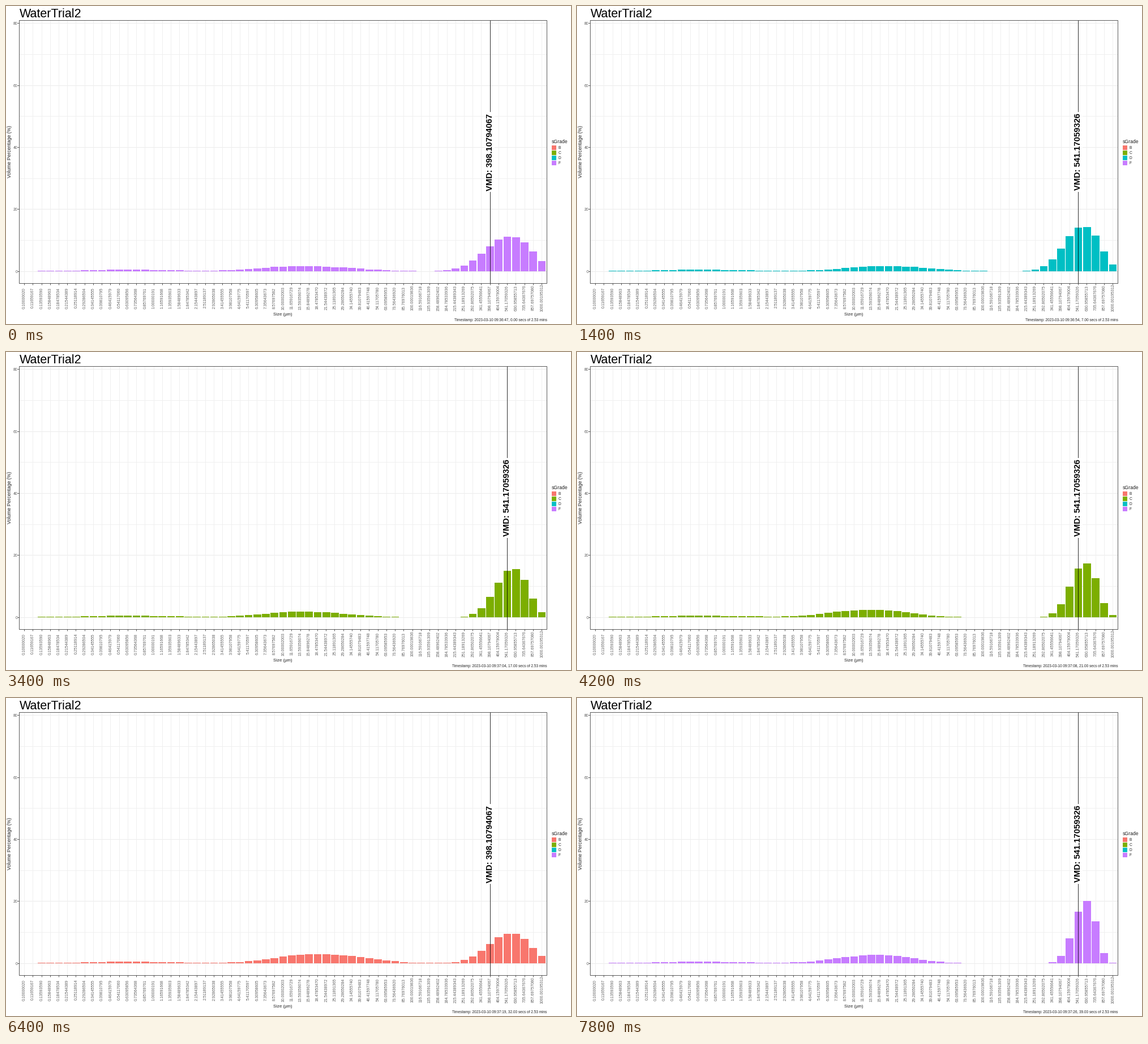
Animation, 998 px wide and 561 px high, one loop 8000 ms. Source, as a matplotlib script:

```python
import numpy as np
import matplotlib.pyplot as plt
from matplotlib.animation import FuncAnimation
from matplotlib.patches import Rectangle

W, H, DPI = 998, 561, 64
FRAMES, STEP_MS = 40, 200
LEFT, RIGHT, TOP, BOTTOM = 23, 955, 25, 489
X0, DX = 32.1, 15.233
ZERO, PER_PCT = 468, 5.475
VISIBLE = .075

COLORS = {"B": "#F8766D", "C": "#7CAE00", "D": "#00BFC4", "F": "#C77CFF"}
DIM, DARK = "#606060", "#222222"

# Size classes: 15 per decade, stored in single precision
N = 61
IDX = np.arange(N)
SIZES = [f"{np.float32(1.00000196 * 10 ** (i / 15 - 1)):.8f}" for i in IDX]

# Key moments (s) of the spray: spread of the coarse mode,
# then height and centre of the middle mode
KEY_T = [0, 7, 17, 21, 27, 32, 39]
SPREAD = [2.78, 2.17, 1.97, 1.63, 2.18, 2.53, 1.37]
MID_TOP = [1.67, 1.68, 1.82, 2.42, 2.65, 2.95, 2.68]
MID_POS = [31.7, 33.2, 32, 31.5, 32.8, 33.5, 32.5]


def state(t):
    return [np.interp(t, KEY_T, track) for track in (SPREAD, MID_TOP, MID_POS)]


def bell(centre, left, right):
    d = IDX - centre
    rise = (np.abs(d) / left) ** 2
    fall = (np.abs(d) / right) ** 2.4
    return np.exp(-np.where(d < 0, rise, fall) / 2)


def spectrum(t):
    spread, top, pos = state(t)
    v = .5 * bell(12, 5.2, 6) + top * bell(pos, 4.3, 2.7 + 1.3 * spread)
    coarse = bell(57.4 - .4 * spread, spread, .92 * spread)
    # The coarse mode takes whatever is left of 100 %
    v += coarse * (100 - v.sum()) / coarse.sum()
    return np.where(v > VISIBLE, np.maximum(v, .2), 0)


def vmd_class(t):
    spread, top, _ = state(t)
    return min(56, round(64.2 - 3 * spread - top))


def grade(t):
    return "FDCBF"[sum(t >= s for s in (4, 12, 24, 36))]


def caption(t):
    sec = 47 + t
    return (f"Timestamp: 2023-03-10 09:{36 + sec // 60}:{sec % 60:02d}, "
            f"{t:.2f} secs of 2.53 mins")


def px(size):
    return size * 72 / DPI


plt.rcParams["font.family"] = "Liberation Sans"
fig = plt.figure(figsize=(W / DPI, H / DPI), dpi=DPI, facecolor="white")
ax = fig.add_axes([0, 0, 1, 1])
ax.set(xlim=(0, W), ylim=(H, 0))
ax.axis("off")


def text(x, y, s, size, color=DARK, ha="left", va="baseline", **kw):
    return ax.text(x, y, s, fontsize=px(size), color=color, ha=ha, va=va, **kw)


def upright(x, y, s, size, color=DARK, **kw):
    return text(x, y, s, size, color, "center", "center", rotation=90, **kw)


def line(xs, ys, color, width, z):
    return ax.plot(xs, ys, color=color, lw=px(width), zorder=z,
                   solid_capstyle="butt")[0]


def box(x, y, w, h, color, z):
    return ax.add_patch(Rectangle((x, y), w, h, fc=color, lw=0, zorder=z))


def x_of(i):
    return X0 + DX * i


# Grid, ticks and axis labels
for pct in range(0, 90, 10):
    y = round(ZERO - pct * PER_PCT)
    major = pct % 20 == 0
    line([LEFT, RIGHT], [y, y], "#EBEBEB" if major else "#F0F0F0", 1, 1)
    if major:
        line([LEFT - 3, LEFT], [y, y], "#333333", .8, 1)
        text(LEFT - 2.5, y + .9, str(pct), 7, DIM, "right", "center_baseline")
for i, label in enumerate(SIZES):
    x = x_of(i)
    line([x, x], [TOP, BOTTOM], "#EFEFEF", 1, 1)
    line([x, x], [BOTTOM, BOTTOM + 3], "#333333", .8, 1)
    upright(x + .4, 515, label, 7, DIM)
ax.add_patch(Rectangle((LEFT, TOP), RIGHT - LEFT, BOTTOM - TOP, fill=False,
                       ec="#333333", lw=px(.8), zorder=6))

text(23.5, 19.5, "WaterTrial2", 21.5, "black")
upright(7, 257, "Volume Percentage (%)", 8.7)
text(489, 545.5, "Size (µm)", 7.8, ha="center")
stamp = text(955.5, 556.5, "", 6.5, ha="right")

# Legend
text(964, 242, "sGrade", 8.6)
for k, (name, color) in enumerate(COLORS.items()):
    y = 245.6 + 9 * k
    box(964, y, 8, 8, color, 2)
    text(976, y + 6.8, name, 6.6)

# Moving parts
bars = [box(x_of(i) + .4 - .45 * DX, ZERO, .9 * DX, 0, "white", 2)
        for i in IDX]
rule = line([0, 0], [TOP, BOTTOM], "black", .8, 3)
plate = box(0, 187, 16, 141, "white", 4)
tag = upright(0, 257.5, "", 14.7, "black", weight="bold", zorder=5)


def draw(t):
    color = COLORS[grade(t)]
    for bar, v in zip(bars, spectrum(t)):
        bar.set_y(ZERO - v * PER_PCT)
        bar.set_height(v * PER_PCT)
        bar.set_facecolor(color)
        bar.set_visible(v > 0)
    i = vmd_class(t)
    x = x_of(i)
    rule.set_xdata([x, x])
    plate.set_x(x - 8)
    tag.set_x(x)
    tag.set_text("VMD: " + SIZES[i])
    stamp.set_text(caption(t))
    return [*bars, rule, plate, tag, stamp]


anim = FuncAnimation(fig, draw, frames=FRAMES, interval=STEP_MS,
                     repeat=True, repeat_delay=0, blit=False)
plt.show()
```
